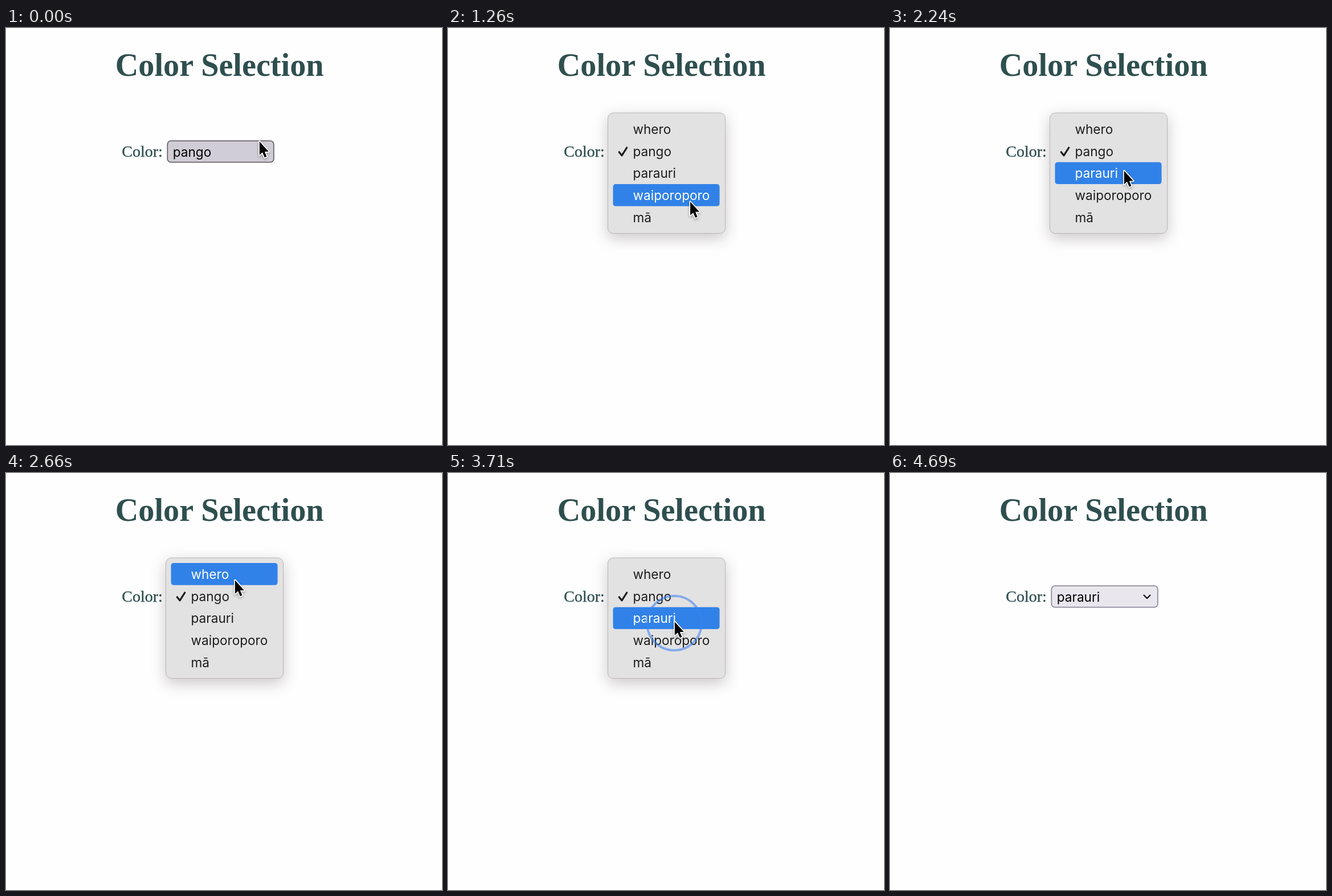
An HTML page that plays this animation: 765x732 px, repeating every 5.11 s.

```html
<!DOCTYPE html>
<html lang="en">
<head>
<meta charset="utf-8">
<title>Color Selection</title>
<style>
  html, body { margin: 0; width: 100%; height: 100%; overflow: hidden; background: #fefefe; }
  svg { display: block; width: 765px; height: 732px; }
  .serif { font-family: "Liberation Serif", "Times New Roman", serif; fill: #2f4f4f; }
  .title { font-size: 56.2px; font-weight: 700; }
  .label { font-size: 28px; stroke: #2f4f4f; stroke-width: .35; }
  .sans { font: 22.6px Inter, "Open Sans", sans-serif; }
  .box { fill: #e9e6ee; stroke: #8f8c9d; stroke-width: 1.8; }
  .hover .box { fill: #d0cdd6; stroke: #69656f; }
  .line { fill: none; stroke-linecap: round; stroke-linejoin: round; }
  .panel { fill: #e2e2e2; stroke: #b8b6b7; filter: drop-shadow(0 8px 13px rgba(40, 20, 25, .24)); }
  .item rect { fill: none; }
  .item text { fill: #1d1d1d; }
  .item path { stroke: #1d1d1d; stroke-width: 3.2; }
  .item.on rect { fill: #3182e8; }
  .item.on text { fill: #fff; }
  .item.on path { stroke: #fff; }
  #ring { fill: none; stroke: #3b82f2; stroke-width: 4; }
  #cursor { filter: drop-shadow(0 2px 2px rgba(0, 0, 0, .3)); }
  #cursor path { fill: #000; stroke: #fff; stroke-width: 3.4; stroke-linejoin: round; paint-order: stroke; }
</style>
</head>
<body>
<svg viewBox="0 0 765 732">
  <text class="serif title" x="191.8" y="84">Color Selection</text>
  <text class="serif label" x="203.3" y="226">Color:</text>
  <g id="select">
    <rect class="box" x="283.3" y="198.2" width="186.5" height="37.5" rx="6"/>
    <text id="value" class="sans" x="292.7" y="225.5"></text>
    <path class="line" d="M445.5 214.5l5.5 5.5 5.5-5.5" stroke="#000" stroke-width="2"/>
  </g>
  <g id="menu">
    <rect class="panel" x="280.5" y="149" width="206" height="211.5" rx="9.5"/>
  </g>
  <circle id="ring"/>
  <g id="cursor"><path d="M.8 1.2V25L6 20.3 9.8 29.2 13.4 27.7 9.8 19H16.9Z"/></g>
</svg>
<script>
const LOOP = 5110, STEP = 70;
const OPEN = 770, PICK = 3640, CLOSED = 3990;
const MOVE_TIME = 560, RING_TIME = 280;
const ROW_TOP = 158, ROW_HEIGHT = 38.7;
const $ = id => document.getElementById(id);

const names = ['whero', 'pango', 'parauri', 'waiporoporo', 'mā'];
const items = names.map((name, i) => {
  const item = document.createElementNS('http://www.w3.org/2000/svg', 'g');
  const y = ROW_TOP + i * ROW_HEIGHT;
  const check = name === 'pango' ? '<path class="line" d="M300.2 217.8L305 223.8 313.8 210"/>' : '';
  item.innerHTML =
    `<rect x="289.5" y="${y}" width="187" height="${ROW_HEIGHT}" rx="4.5"/>` +
    `<text class="sans" x="324.5" y="${y + 28}">${name}</text>${check}`;
  $('menu').append(item);
  return item;
});

const moves = [
  { at: 0, x: 444, y: 205 },
  { at: 910, x: 421, y: 320 },
  { at: 1400, x: 417, y: 298 },
  { at: 2100, x: 401, y: 187 },
  { at: 3080, x: 397, y: 260 },
  { at: 4340, x: 408, y: 830 }
];

const easeOut = p => 1 - (1 - p) ** 2;
const progress = (t, start, time) => Math.min(1, Math.max(0, (t - start) / time));

// Each move blends the pointer from wherever it is towards its goal.
function pointerAt(t) {
  let x = 444, y = 198;
  for (const move of moves) {
    const k = easeOut(progress(t, move.at, MOVE_TIME));
    x += (move.x - x) * k;
    y += (move.y - y) * k;
  }
  return [x, y];
}

function drawRing(t) {
  const start = t < PICK ? OPEN : PICK;
  const [x, y] = pointerAt(start);
  const p = progress(t, start, RING_TIME);
  const ring = $('ring');
  ring.setAttribute('cx', x);
  ring.setAttribute('cy', y + 3.5);
  ring.setAttribute('r', 32 + 36 * easeOut(p));
  ring.style.opacity = t < start ? 0 : .62 * Math.sin(Math.PI * (.15 + .85 * p));
}

function draw() {
  const t = Math.floor(performance.now() % LOOP / STEP) * STEP;
  const [x, y] = pointerAt(t);
  const open = t >= OPEN && t < CLOSED;
  const blink = t === PICK + 2 * STEP;
  const row = Math.floor((y - ROW_TOP) / ROW_HEIGHT);

  $('cursor').setAttribute('transform', `translate(${x} ${y})`);
  $('select').classList.toggle('hover', t < PICK);
  $('value').textContent = t < PICK ? 'pango' : 'parauri';
  $('menu').style.opacity = !open ? 0 : t >= CLOSED - STEP ? .5 : 1;
  items.forEach((item, i) => item.setAttribute('class', i === row && !blink ? 'item on' : 'item'));
  drawRing(t);
  requestAnimationFrame(draw);
}
draw();
</script>
</body>
</html>
```
